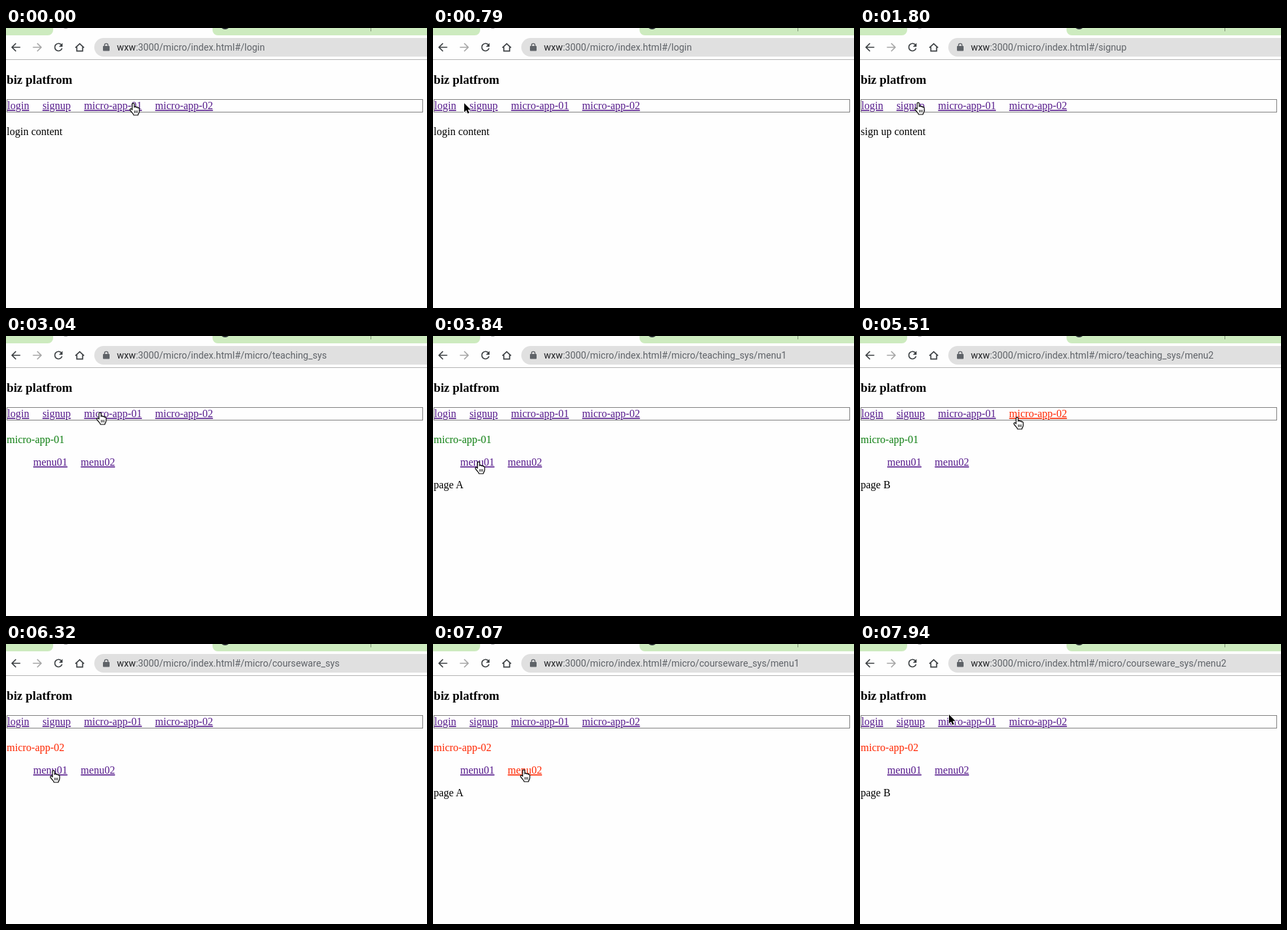
Animation of 634 by 421 pixels, one loop 8 s. Source, as an HTML page:

```html
<!DOCTYPE html>
<html lang="en">
<head>
<meta charset="utf-8">
<title>Micro app routing</title>
<style>
  html, body { margin: 0; width: 100%; height: 100%; overflow: hidden; background: #fefefe; }
  svg { display: block; width: 634px; height: 421px; }
  text { font: 16px "Liberation Serif", "Times New Roman", serif; white-space: pre; }
  .url { font: 14.2px Roboto, sans-serif; fill: #5f6368; }
  .host { fill: #202124; }
  .title { font-size: 18.72px; font-weight: bold; }
  .link { fill: #551a8b; text-decoration: underline; }
  .icon { fill: none; stroke: #3c4043; stroke-width: 1.7; }
</style>
</head>
<body>
<svg viewBox="0 0 634 421">
  <rect width="634" height="421" fill="#fefefe"/>
  <g fill="#cdebbf">
    <rect x="-20" y="-20" width="91" height="31" rx="8"/>
    <rect x="311" y="-20" width="400" height="31" rx="8"/>
  </g>
  <circle cx="90" cy="-7.4" r="8" fill="#5f6368"/>
  <circle cx="330" cy="-6" r="8" fill="#24292e"/>
  <path d="M549.5 0V5" stroke="#7d9275"/>
  <path d="M0 47.5H634" stroke="#b4b4b4"/>

  <path class="icon" d="M21.5 29H9.5M15 23L9 29L15 35"/>
  <path class="icon" d="M40.5 29H52.5M47 23L53 29L47 35" style="stroke:#a6a6a6"/>
  <path class="icon" d="M83.3 25.2A5.6 5.6 0 1 0 84.4 30.6"/>
  <path d="M85.2 22.6V28.2H79.6Z" fill="#3c4043"/>
  <path class="icon" d="M104.5 29.6L111 23.6L117.500 29.6M106.600 28.500V34.600H115.400V28.500"/>
  <rect x="133" y="15" width="540" height="28" rx="14" fill="#e0e0e0"/>
  <rect x="146" y="27" width="10" height="7.500" rx="1" fill="#5f6368"/>
  <path d="M148.400 27.500V26A2.600 2.600 0 0 1 153.600 26V27.500" fill="none" stroke="#5f6368" stroke-width="1.400"/>
  <text class="url" x="167" y="34"><tspan class="host">wxw</tspan><tspan id="path"></tspan></text>

  <text class="title" x="1" y="84">biz platfrom</text>
  <rect x="1.500" y="107.500" width="626" height="19" fill="none" stroke="#808080"/>
  <g id="nav"></g>
  <text id="content" x="1" y="161"></text>
  <g id="menu"></g>
  <text id="page" x="1" y="229"></text>

  <g id="cursor">
    <g id="hand" fill="#fff" stroke="#000" stroke-width="1.200" stroke-linejoin="round" stroke-linecap="round">
      <path d="M-2 10V1.800a1.600 1.600 0 0 1 3.200 0V6.200q0-1 1.300-1t1.600 1.300q.3-.8 1.400-.6t1.300 1.400q.3-.6 1.200-.3t.8 1.600v3.200q0 2-1 3.600t-1 2.600H.2q-.2-1.400-1.600-2.800L-4.800 11q-1-1.400-.2-2.200t2-.1z"/>
      <path d="M1.500 11.500V14.500M3.600 11.500V14.500M5.700 11.500V14.500" stroke-width=".9"/>
    </g>
    <path id="arrow" d="M0 0V13.500L3.200 10.600L5.300 15.600L7.600 14.600L5.500 9.800H9.600Z" stroke="#fff" stroke-width="1.600" paint-order="stroke"/>
  </g>
</svg>
<script>
const LOOP = 8000, RED = '#ff2600', GREEN = '#0f7f12';
const $ = id => document.getElementById(id);

// label, x, width
const navItems = [['login', 2, 33], ['signup', 54.9, 43], ['micro-app-01', 117.6, 87], ['micro-app-02', 224.6, 87]];
const menuItems = [['menu01', 41, 52], ['menu02', 112.6, 52]];

function addLinks(group, items, y) {
  return items.map(([label, x, w]) => {
    const el = document.createElementNS('http://www.w3.org/2000/svg', 'text');
    el.setAttribute('class', 'link');
    el.setAttribute('x', x);
    el.setAttribute('y', y);
    el.textContent = label;
    group.append(el);
    return { el, x, w, y };
  });
}
const nav = addLinks($('nav'), navItems, 122);
const menu = addLinks($('menu'), menuItems, 195);

// Each event changes part of the page state.
const events = [
  [0, { path: 'login', content: 'login content', color: '#000', menu: false, page: '', pressed: null }],
  [1200, { pressed: nav[1] }],
  [1320, { pressed: null, path: 'signup', content: 'sign up content' }],
  [2450, { pressed: nav[2] }],
  [2560, { pressed: null, path: 'micro/teaching_sys', content: '' }],
  [2800, { content: 'micro-app-01', color: GREEN, menu: true }],
  [3720, { pressed: menu[0] }],
  [3840, { pressed: null, path: 'micro/teaching_sys/menu1', page: 'page A' }],
  [4540, { pressed: menu[1] }],
  [4650, { pressed: null, path: 'micro/teaching_sys/menu2', page: 'page B' }],
  [5510, { pressed: nav[3] }],
  [5630, { pressed: null, path: 'micro/courseware_sys', content: '', menu: false, page: '' }],
  [5870, { content: 'micro-app-02', color: RED, menu: true }],
  [6430, { pressed: menu[0] }],
  [6540, { pressed: null, path: 'micro/courseware_sys/menu1', page: 'page A' }],
  [7070, { pressed: menu[1] }],
  [7180, { pressed: null, path: 'micro/courseware_sys/menu2', page: 'page B' }]
];

// Cursor hot spot: time, x, y
const moves = [
  [0, 192, 113], [30, 192, 113], [500, 9, 121], [850, 48, 113], [880, 48, 113], [1020, 80, 112],
  [1790, 80, 112], [1800, 88, 112], [2270, 146, 112],
  [3030, 146, 112], [3040, 142, 115], [3600, 69, 189],
  [3860, 69, 189], [4130, 137, 189],
  [4680, 137, 189], [5290, 235, 120], [5340, 235, 120], [5460, 237, 122],
  [5650, 237, 122], [6140, 74, 193], [6310, 72, 190],
  [6560, 72, 190], [6950, 137, 189],
  [7200, 137, 189], [7640, 133, 105], [7939, 133, 105], [7940, 134, 106], [LOOP, 134, 106]
];

function cursorAt(t) {
  const i = moves.findIndex(m => m[0] > t);
  const [t0, x0, y0] = moves[i - 1], [t1, x1, y1] = moves[i];
  const u = (t - t0) / (t1 - t0), k = u * (2 - u);
  return [Math.round(x0 + (x1 - x0) * k), Math.round(y0 + (y1 - y0) * k)];
}

function stateAt(t) {
  return Object.assign({}, ...events.filter(e => e[0] <= t).map(e => e[1]));
}

function render(t) {
  const s = stateAt(t), [x, y] = cursorAt(t);
  $('path').textContent = ':3000/micro/index.html#/' + s.path;
  $('content').textContent = s.content;
  $('content').style.fill = s.color;
  $('page').textContent = s.page;
  $('menu').style.display = s.menu ? '' : 'none';

  const links = s.menu ? [...nav, ...menu] : nav;
  for (const link of [...nav, ...menu]) link.el.style.fill = link === s.pressed ? RED : '';
  const over = links.some(l => x >= l.x && x <= l.x + l.w && y >= l.y - 14 && y <= l.y + 4);
  $('hand').style.display = over ? '' : 'none';
  $('arrow').style.display = over ? 'none' : '';
  $('cursor').setAttribute('transform', `translate(${x} ${y})`);
}

function tick() {
  render(performance.now() % LOOP);
  requestAnimationFrame(tick);
}
tick();
</script>
</body>
</html>
```
